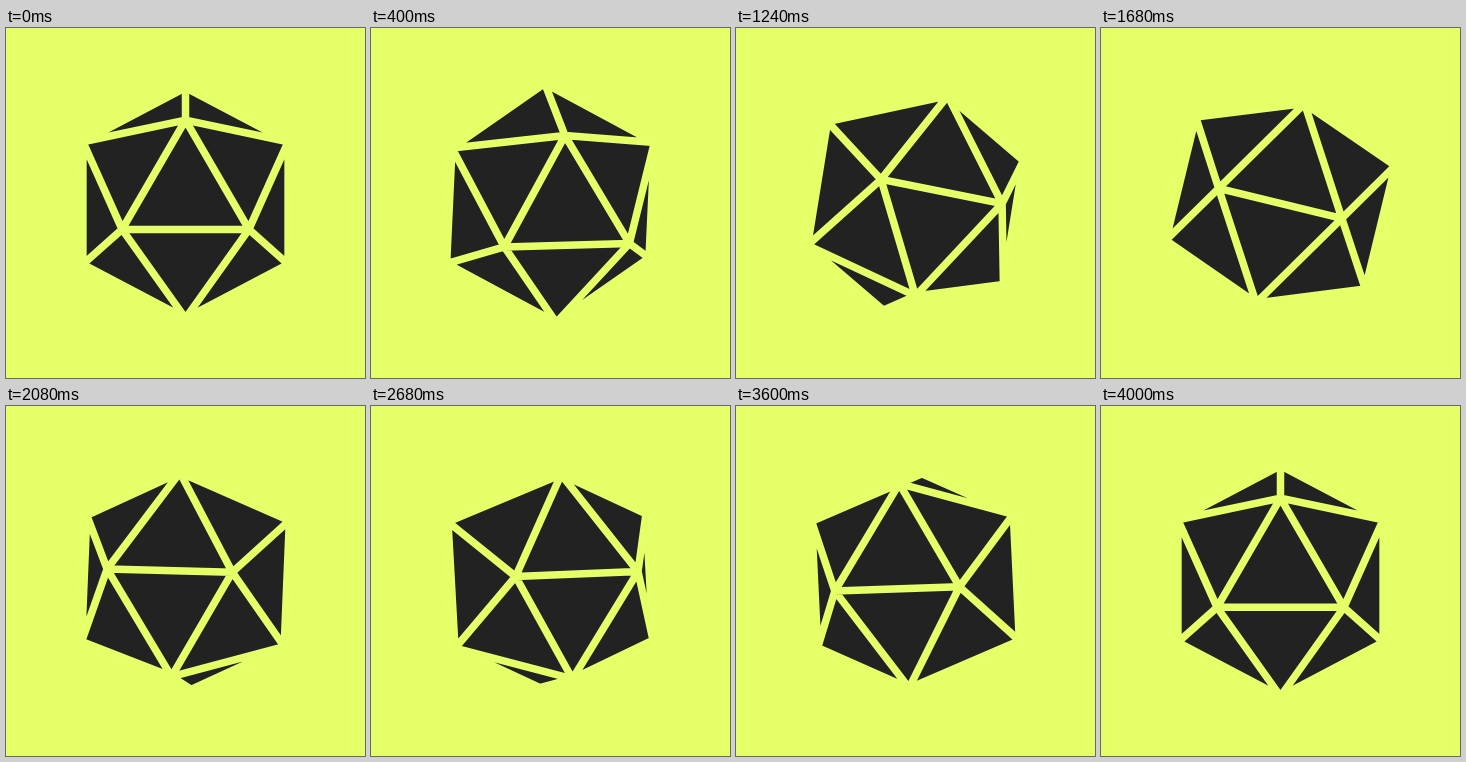
These frames come from a looping animation (359 px wide and 350 px high, 5 s). An HTML page with a canvas:

```html
<!DOCTYPE html>
<html lang="en">
<head>
<meta charset="utf-8">
<title>Tumbling icosahedron</title>
<style>
  html, body { margin: 0; width: 100%; height: 100%; overflow: hidden; background: #e5ff69; }
  canvas { display: block; }
</style>
</head>
<body>
<canvas id="stage" width="359" height="350"></canvas>
<script>
const ctx = document.getElementById('stage').getContext('2d');
const PAPER = '#e5ff69', INK = '#222222';
const RADIUS = 120.6, GAP = 7.5, CENTER = [179.5, 175];
const LOOP = 5000, STEP = 40, SPIN = 4000, DELAY = 12;
const rad = degrees => degrees * Math.PI / 180;

function rotateX([x, y, z], angle) {
  const c = Math.cos(angle), s = Math.sin(angle);
  return [x, y * c - z * s, y * s + z * c];
}

function rotateY([x, y, z], angle) {
  const c = Math.cos(angle), s = Math.sin(angle);
  return [x * c + z * s, y, z * c - x * s];
}

// Three corners of a ring around the viewing axis.
const ring = (radius, depth, start) => [0, 120, 240].map(turn => {
  const a = rad(start + turn);
  return [radius * Math.cos(a), radius * Math.sin(a), depth];
});

// Unit icosahedron facing the viewer, tilted slightly upwards.
const half = [...ring(0.6071, 0.7947, 90), ...ring(0.9822, 0.1876, 270)];
const vertices = [...half, ...half.map(v => v.map(n => -n))].map(v => rotateX(v, rad(-6)));

const adjacent = (a, b) =>
  vertices[a].reduce((sum, n, i) => sum + n * vertices[b][i], 0) > 0.4;
const faces = [];
for (let a = 0; a < 12; a++)
  for (let b = a + 1; b < 12; b++)
    for (let c = b + 1; c < 12; c++)
      if (adjacent(a, b) && adjacent(b, c) && adjacent(a, c)) faces.push([a, b, c]);

function angleAt(ms) {
  const t = Math.min(1, Math.max(0, (ms - DELAY) / SPIN));
  return 2 * Math.PI * t * t * (3 - 2 * t);
}

function draw(ms) {
  const angle = angleAt(ms);
  const points = vertices.map(v => rotateX(rotateY(v, angle), angle));
  const outline = new Path2D();
  for (const face of faces) {
    const corners = face.map(i => points[i]);
    if (corners.reduce((sum, p) => sum + p[2], 0) <= 0) continue;
    for (const [i, [x, y]] of corners.entries())
      outline[i ? 'lineTo' : 'moveTo'](CENTER[0] + x * RADIUS, CENTER[1] - y * RADIUS);
    outline.closePath();
  }
  ctx.fillStyle = PAPER;
  ctx.fillRect(0, 0, 359, 350);
  ctx.fillStyle = INK;
  ctx.fill(outline, 'nonzero');
  ctx.strokeStyle = PAPER;
  ctx.lineWidth = GAP;
  ctx.lineJoin = 'round';
  ctx.stroke(outline);
}

const start = performance.now();
function tick() {
  const ms = (performance.now() - start) % LOOP;
  draw(Math.floor(ms / STEP) * STEP);
  requestAnimationFrame(tick);
}
tick();
</script>
</body>
</html>
```
